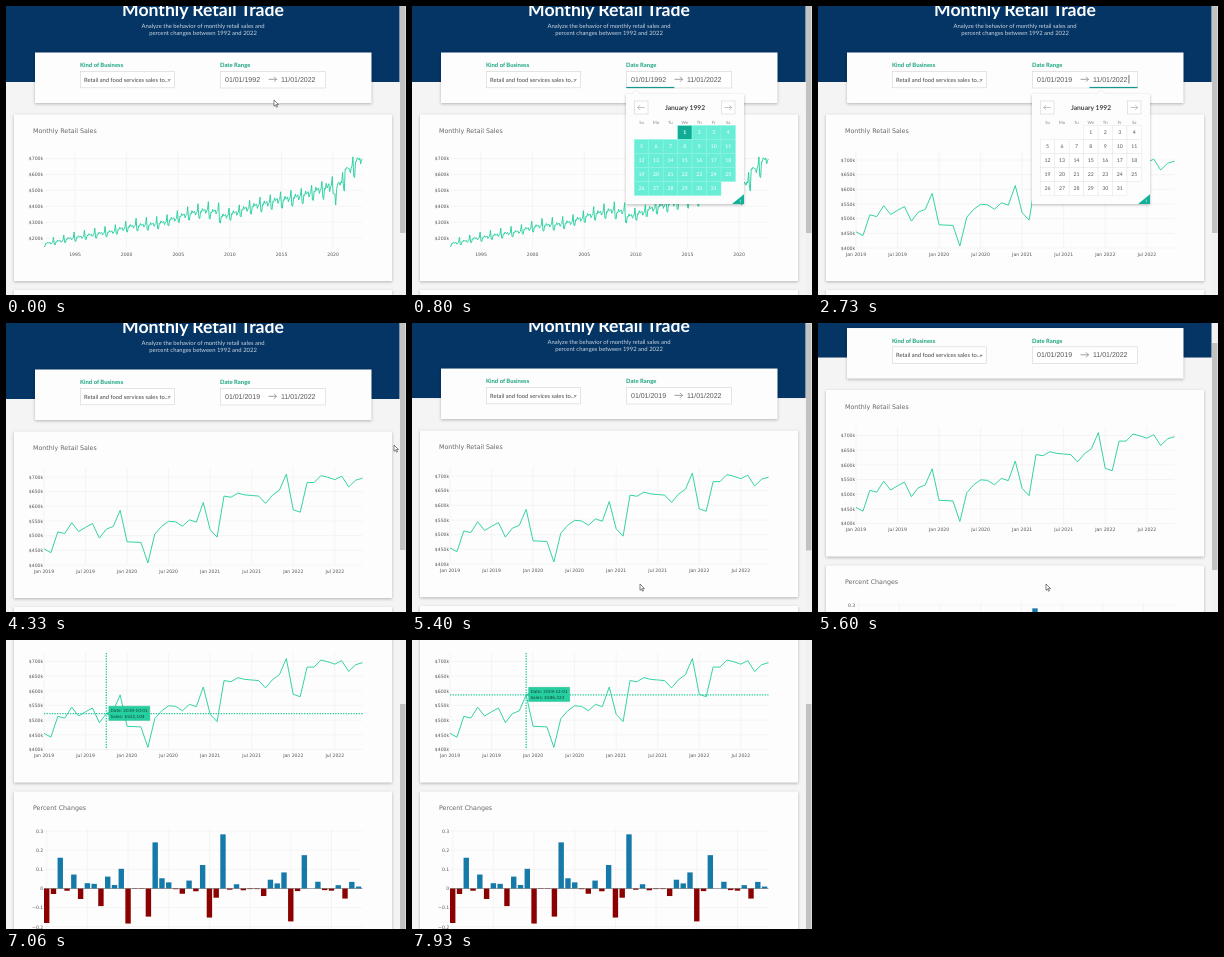
Write an HTML page that moves like this. It is 400x289 px and loops after 8 s.

```html
<!DOCTYPE html>
<html lang="en">
<head>
<meta charset="utf-8">
<title>Monthly Retail Trade</title>
<style>
  html, body { margin: 0; height: 100%; overflow: hidden; background: #f4f4f4; }
  svg { display: block; width: 100vw; height: 100vh; }
  text { font-family: Lato, sans-serif; text-rendering: geometricPrecision; }
  .plot text { font: 4.6px "DejaVu Sans", sans-serif; fill: #555; }
  .plot .title { font-size: 6.3px; fill: #666; }
  .grid { stroke: #eee; stroke-width: .6; }
  .line { fill: none; stroke: #2bd0a2; stroke-width: .95; stroke-linejoin: round; }
  .card { fill: #fdfdfd; filter: drop-shadow(0 1px 1.5px #0004); }
  .label { font-size: 5.9px; font-weight: 700; fill: #16a37c; }
  .field { fill: #fff; stroke: #d4d4d4; stroke-width: .6; }
  .date { font: 7px "Liberation Sans", Arial, sans-serif; fill: #555; white-space: pre; }
  .middle { text-anchor: middle; }
  .end { text-anchor: end; }
  .spike { stroke: #1fc998; stroke-width: 1.3; stroke-dasharray: 1.3; }
</style>
</head>
<body>
<svg id="stage" viewBox="0 0 400 289" preserveAspectRatio="none">
  <g id="page">
    <rect y="-10" width="394" height="86" fill="#043565"/>
    <text x="197" y="10.3" class="middle" font-size="17.6" font-weight="700" fill="#fff">Monthly Retail Trade</text>
    <g class="middle" font-size="5.9" fill="#ccd6e1">
      <text x="197" y="21.7">Analyze the behavior of monthly retail sales and</text>
      <text x="197" y="28.9">percent changes between 1992 and 2022</text>
    </g>
    <rect class="card" x="29" y="46.5" width="336.500" height="50.5"/>
    <text class="label" x="74" y="61">Kind of Business</text>
    <rect class="field" x="74.300" y="65.300" width="94" height="16.500"/>
    <text x="78" y="75.800" font-size="5.8" fill="#444">Retail and food services sales to...</text>
    <path d="M161.500 73.300h3.400l-1.700 2z" fill="#888"/>
    <text class="label" x="214" y="61">Date Range</text>
    <rect class="field" x="214.300" y="65.300" width="105" height="16.700"/>
    <rect id="selection" y="68.500" height="9.500" fill="#2f7de1"/>
    <text class="date" id="startDate" x="219" y="75.900"></text>
    <path d="M262.500 73.300h8m-2.500-2.500l2.500 2.500l-2.500 2.500" fill="none" stroke="#777" stroke-width=".7"/>
    <text class="date" x="275" y="75.900">11/01/2022</text>
    <rect id="caret" x="310.600" y="69" width=".7" height="8.500" fill="#333"/>
    <rect id="focus" y="80.900" width="48" height="1.200" fill="#17968f"/>

    <rect class="card" x="8" y="108.500" width="378" height="166.500"/>
    <g class="plot" id="allYears"></g>
    <g class="plot" id="recent"></g>
    <rect class="card" x="8" y="284" width="378" height="166"/>
    <g class="plot" id="changes"></g>
    <g class="plot" id="hover">
      <line class="spike" id="spikeX" y1="145.500" y2="242"/>
      <line class="spike" id="spikeY" x1="38" x2="356.500"/>
      <g id="tip">
        <path d="M0 0l2.500-1.500V-7.500h41V6.700H2.500V1.500z" fill="#25cf9f" stroke="#1bb088" stroke-width=".4"/>
        <text id="tipDate" x="4.300" y="-2" style="font-size:4.2px;fill:#143"></text>
        <text id="tipSales" x="4.300" y="4" style="font-size:4.2px;fill:#143"></text>
      </g>
    </g>
    <g id="calendar">
      <rect class="card" x="214" y="88" width="118" height="110"/>
      <path id="fang" d="M-4.500 88.300L0 83.800L4.500 88.300" fill="#fff" stroke="#ddd" stroke-width=".5"/>
      <text x="273" y="103.700" class="middle" font-size="6.7" font-weight="700" fill="#444">January 1992</text>
      <path d="M332 188.300V198H320z" fill="#12b096"/>
      <text x="327.300" y="196.800" font-size="4.500" fill="#fff">?</text>
    </g>
  </g>
  <rect x="393.500" width="6.500" height="289" fill="#f1f1f1"/>
  <rect id="thumb" x="394" width="5.500" height="227" fill="#c2c2c2"/>
  <path id="cursor" d="M0 0v6.300l1.500-1.400l1 2.300l1-.4l-1-2.300h2z" fill="#fff" stroke="#333" stroke-width=".6"/>
</svg>
<script>
const $ = id => document.getElementById(id);
const LOOP = 8000, SCROLL = 132.5, LEFT = 38, RIGHT = 356.5, TOP = 145.5, BOTTOM = 242;

function add(parent, tag, attrs, text = "") {
  const node = document.createElementNS("http://www.w3.org/2000/svg", tag);
  set(node, attrs);
  node.textContent = text;
  return parent.appendChild(node);
}
function set(node, attrs) {
  for (const key in attrs) node.setAttribute(key, attrs[key]);
}
const show = (id, on) => $(id).setAttribute("visibility", on ? "visible" : "hidden");

// Monthly sales in thousands of millions: yearly means with a seasonal shape, then single months.
const yearMeans = [168, 180, 196, 206, 218, 228, 238, 257, 273, 280, 285, 296, 318, 341,
  358, 370, 366, 338, 357, 383, 402, 417, 435, 445, 458, 477, 500];
const season = [.88, .87, .99, .98, 1.04, 1, 1.01, 1.03, .96, 1, 1.02];
const recentSales = [455, 442, 513, 507, 544, 514.218, 528.437, 541.306, 491.582, 522.104, 531.647, 586.323,
  479, 478, 477, 407, 505, 532, 549, 547, 532, 554, 546, 613,
  520, 495, 635, 631, 645, 639, 637, 635, 610, 638, 655, 710,
  588, 580, 681, 681, 705, 699, 691, 703, 666, 689, 696];
const allSales = yearMeans.flatMap((mean, year) =>
  [...season, 1.22 - year * .0042].map(factor => mean * factor)).concat(recentSales);

const allX = i => LEFT + i * .8605;
const allY = v => 152.5 + (700 - v) * .159;
const recentX = i => LEFT + i * 6.924;
const recentY = v => 154 + (700 - v) * .2933;

function gridX(plot, x, top, bottom, label) {
  add(plot, "line", { class: "grid", x1: x, x2: x, y1: top, y2: bottom });
  add(plot, "text", { class: "middle", x, y: bottom + 7.8 }, label);
}
function gridY(plot, y, label) {
  add(plot, "line", { class: "grid", x1: LEFT, x2: RIGHT, y1: y, y2: y });
  add(plot, "text", { class: "end", x: LEFT - .8, y: y + 1.7 }, label);
}
function drawLine(plot, values, x, y) {
  add(plot, "text", { class: "title", x: 27, y: 127.3 }, "Monthly Retail Sales");
  add(plot, "polyline", { class: "line", points: values.map((v, i) => `${x(i)},${y(v)}`).join(" ") });
}

for (let v = 200; v <= 700; v += 100) gridY($("allYears"), allY(v), `$${v}k`);
for (let year = 1995; year <= 2020; year += 5) gridX($("allYears"), allX((year - 1992) * 12), TOP, BOTTOM, year);
drawLine($("allYears"), allSales, allX, allY);

for (let v = 400; v <= 700; v += 50) gridY($("recent"), recentY(v), `$${v}k`);
for (let i = 0; i < 47; i += 6) {
  const label = `${i % 12 ? "Jul" : "Jan"} ${2019 + Math.floor(i / 12)}`;
  gridX($("recent"), recentX(i), TOP, BOTTOM, label);
}
drawLine($("recent"), recentSales, recentX, recentY);

const changes = $("changes"), zero = 381, barStep = 6.78;
add(changes, "text", { class: "title", x: 27, y: 302.8 }, "Percent Changes");
for (let n = 3; n >= -2; n--) gridY(changes, zero - n * 19.15, n ? (n / 10).toFixed(1).replace("-", "−") : "0");
for (let i = 0; i < 47; i += 6) gridX(changes, 40.7 + i * barStep, 322, 425, "");
recentSales.forEach((v, i) => {
  const change = v / (i ? recentSales[i - 1] : 555) - 1, height = Math.abs(change) * 191.5;
  add(changes, "rect", {
    x: 38 + i * barStep, width: 5.4, height,
    y: change > 0 ? zero - height : zero, fill: change > 0 ? "#157aa9" : "#8b0000"
  });
});
add(changes, "line", { x1: LEFT, x2: RIGHT, y1: zero, y2: zero, stroke: "#555", "stroke-width": .5 });

const calendar = $("calendar"), cell = 14.45;
[[222.5, "M5-2.500L2.500 0L5 2.500M2.500 0h7"], [309.5, "M7-2.500L9.500 0L7 2.500M9.500 0h-7"]].forEach(([x, arrow]) => {
  add(calendar, "rect", { class: "field", x, y: 95, width: 13.5, height: 13 });
  add(calendar, "path", {
    d: arrow, transform: `translate(${x + .7} 101.500)`, fill: "none", stroke: "#999", "stroke-width": .6
  });
});
["Su", "Mo", "Tu", "We", "Th", "Fr", "Sa"].forEach((name, i) =>
  add(calendar, "text", { class: "middle", x: 229.5 + i * cell, y: 117.6, "font-size": 4.3, fill: "#888" }, name));
const days = Array.from({ length: 31 }, (_, i) => {
  const x = 222.3 + (i + 3) % 7 * cell, y = 119.5 + Math.floor((i + 3) / 7) * 14;
  return {
    box: add(calendar, "rect", { x, y, width: cell, height: 14, "stroke-width": .5 }),
    text: add(calendar, "text", { class: "middle", x: x + cell / 2, y: y + 8.9, "font-size": 5.2 }, i + 1)
  };
});
function paintDays(inRange) {
  days.forEach(({ box, text }, i) => {
    set(box, { fill: !inRange ? "#fff" : i ? "#68edd6" : "#10ad94", stroke: inRange ? "#8df4e2" : "#e4e7e7" });
    set(text, { fill: inRange ? "#fff" : "#555", "font-weight": inRange && !i ? 700 : 400 });
  });
}

const clamp = v => Math.min(1, Math.max(0, v));
const ease = v => (v = clamp(v)) * v * (3 - 2 * v);

// Pointer stops: time, x, y.
const pointerPath = [[0, 268, 94], [100, 268, 94], [620, 253, 74], [2900, 262, 76], [3500, 345, 92],
  [4150, 388, 122], [4400, 388, 122], [4700, 372, 205], [5200, 228, 261], [6060, 228, 261],
  [6440, 92.5, 130], [6500, 92.5, 130], [6680, 94, 100], [7200, 101, 70], [7750, 114, 57], [LOOP, 114, 57]];
function pointerAt(t) {
  const k = pointerPath.findIndex(stop => stop[0] > t);
  const [t0, x0, y0] = pointerPath[k - 1], [t1, x1, y1] = pointerPath[k];
  const p = ease((t - t0) / (t1 - t0));
  return [x0 + (x1 - x0) * p, y0 + (y1 - y0) * p];
}

function render(t) {
  const scroll = SCROLL * ease((t - 5370) / 620);
  set($("page"), { transform: `translate(0 ${-scroll})` });
  set($("thumb"), { y: scroll / SCROLL * 64 });

  const zoomed = t >= 2660, open = t >= 730 && t < 4260;
  show("allYears", !zoomed);
  show("recent", zoomed);

  const typed = [2060, 2230, 2420, 2590].filter(key => t >= key).length;
  const selected = typed ? 0 : Math.ceil(4 * clamp((t - 1300) / 350));
  const text = "01/01/" + (typed ? "2019".slice(0, typed) : "1992");
  const dark = text.slice(0, text.length - selected);
  $("startDate").innerHTML = `${dark}<tspan fill="#fff">${text.slice(dark.length)}</tspan>`;
  set($("selection"), { x: 254.1 - selected * 3.9, width: selected * 3.9 });
  show("caret", zoomed && open && (t - 2660) % 1000 < 500);
  show("focus", open);
  set($("focus"), { x: zoomed ? 271.5 : 214.3 });
  show("calendar", open);
  set($("fang"), { transform: `translate(${zoomed ? 283 : 224} 0)` });
  paintDays(!typed);

  const [x, y] = pointerAt(t);
  const hovering = t > 6500 && y + SCROLL < BOTTOM;
  show("hover", hovering);
  show("cursor", !hovering && (t < 620 || t > 2900));
  set($("cursor"), { transform: `translate(${x} ${y})` });
  if (hovering) {
    const month = Math.round((x - LEFT) / 6.924);
    const px = recentX(month), py = recentY(recentSales[month]);
    set($("spikeX"), { x1: px, x2: px });
    set($("spikeY"), { y1: py, y2: py });
    set($("tip"), { transform: `translate(${px} ${py})` });
    $("tipDate").textContent = `Date: 2019-${String(month + 1).padStart(2, "0")}-01`;
    $("tipSales").textContent = `Sales: $${Math.round(recentSales[month] * 1000).toLocaleString("en-US")}`;
  }
}

function frame() {
  render(performance.now() % LOOP);
  requestAnimationFrame(frame);
}
frame();
</script>
</body>
</html>
```
